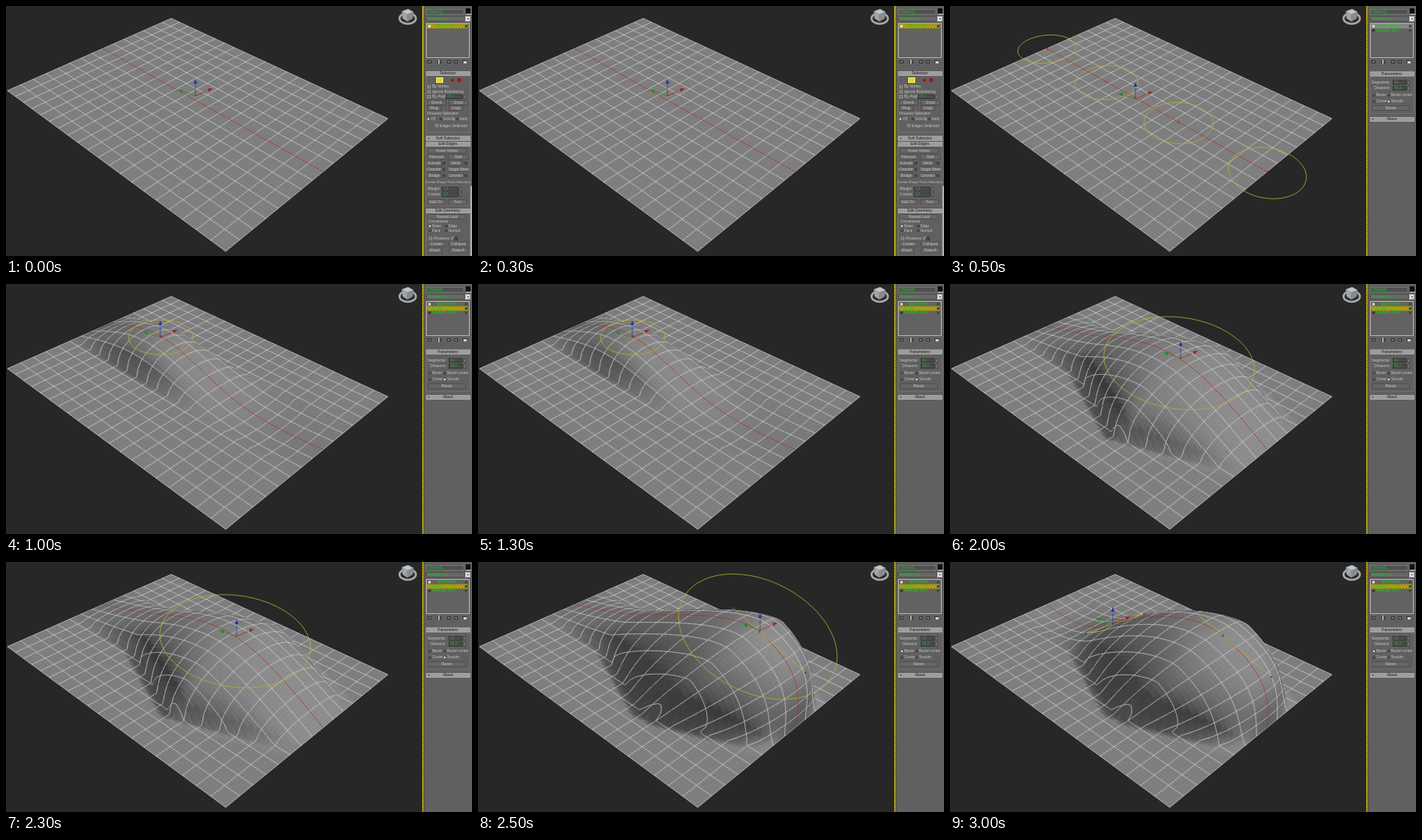
Animation, 598 px wide and 322 px high, one loop 3.5 s. Source, as an HTML page with a canvas:

```html
<!DOCTYPE html>
<html>
<head>
<meta charset="utf-8">
<style>
html, body { margin: 0; width: 598px; height: 322px; overflow: hidden; background: #272727; }
canvas { display: block; }
</style>
</head>
<body>
<canvas id="stage" width="598" height="322"></canvas>
<script>
const ctx = document.getElementById('stage').getContext('2d');
const COLS = 20, ROWS = 15, MID = 7, SUB = 5;
const YELLOW = '#b9b02c', RED = '#b02c2c';

// Knots are [column, height, tangent column, tangent height, back handle scale]
const rest = [[6.67, 0, 2.22, 0], [13.33, 0, 2.22, 0]];
const lifted = [6.67, 1.85, 2.22, .75];
const arched = [lifted, [13.33, 3.05, 2.22, -.27]];
const scenes = [
  { knots: rest, gizmo: [243, 116] },
  { knots: rest, gizmo: [238, 120], circles: [0, 1, 2, 3], distance: '40.0' },
  { knots: [[6.67, 1.85, 2.22, -.12], [13.33, 0, 2.22, -.49]], gizmo: [198, 69], circles: [1], distance: '40.0' },
  { knots: arched, gizmo: [296, 96], circles: [2], distance: '40.0' },
  { knots: arched, wide: true, gizmo: [296, 96], circles: [2], distance: '86.2' },
  { knots: [lifted, [17, 5, 3.1, -1.14, .6]], wide: true, gizmo: [362, 88], circles: [2], handles: [1], distance: '86.2' },
  { knots: [[7.4, 1.4, 3, 2], [16.45, 4.5, 3.35, -1.07, .65]], wide: true, gizmo: [209, 80], handles: [0, 1], distance: '40.0' }
];

function project([i, j, z]) {
  const w = 1 - .01178 * i - .01215 * j - .0131 * z;
  return [(212 + 8.13 * i - 14.03 * j - 3.5 * z) / w, (16 + 4.742 * i + 4.876 * j - 14.51 * z) / w, w];
}

function polyline(points, color, width = 1, close = false) {
  ctx.beginPath();
  points.forEach(p => ctx.lineTo(p[0], p[1]));
  if (close) ctx.closePath();
  ctx.strokeStyle = color;
  ctx.lineWidth = width;
  ctx.stroke();
}

function dot(x, y, r, color) {
  ctx.fillStyle = color;
  ctx.beginPath();
  ctx.arc(x, y, r, 0, 7);
  ctx.fill();
}

const handle = ([x, z, tx, tz, back = 1], side) => {
  const m = side < 0 ? -back : side;
  return [x + m * tx, z + m * tz];
};

// Spline through the two knots with natural ends
function spline([a, b], s) {
  const k = Math.min(2, Math.floor(s * 3)), t = s * 3 - k, q = 1 - t;
  const aIn = handle(a, -1), aOut = handle(a, 1), bIn = handle(b, -1), bOut = handle(b, 1);
  return [0, 1].map(n => {
    const end = n ? 0 : COLS;
    const c = [[0, aIn[n] / 2, aIn[n], a[n]],
      [a[n], aOut[n], bIn[n], b[n]],
      [b[n], bOut[n], (bOut[n] + end) / 2, end]][k];
    return q * q * q * c[0] + 3 * q * q * t * c[1] + 3 * q * t * t * c[2] + t * t * t * c[3];
  });
}

const knotRadius = (scene, k) => scene.wide && k === 2 ? 4.45 : 2.15;

// Half width of the deformed strip at a column
function reach(scene, i) {
  const s = i / COLS * 3, k = Math.min(2, Math.floor(s));
  return 1.18 * (knotRadius(scene, k) + (knotRadius(scene, k + 1) - knotRadius(scene, k)) * (s - k));
}

function buildSurface(scene) {
  return Array.from({ length: COLS * SUB + 1 }, (_, a) => {
    const i = a / SUB, [x, z] = spline(scene.knots, i / COLS), r = reach(scene, i);
    return Array.from({ length: ROWS * SUB + 1 }, (_, b) => {
      const j = b / SUB, pull = Math.sqrt(Math.max(0, 1 - ((j - MID) / r) ** 2));
      const pos = [i + (x - i) * pull, j, z * pull];
      return { pos, at: project(pos) };
    });
  });
}

// Soft shading: the normal spans a few neighbouring facets
function shade(grid, a, b) {
  const lo = v => Math.max(0, v - 2), hi = (v, max) => Math.min(max, v + 3);
  const a0 = lo(a), a1 = hi(a, COLS * SUB), b0 = lo(b), b1 = hi(b, ROWS * SUB);
  const span = (p, q) => [0, 1, 2].map(n => q.pos[n] - p.pos[n]);
  const u = span(grid[a0][b0], grid[a1][b1]), v = span(grid[a1][b0], grid[a0][b1]);
  const n = [u[1] * v[2] - u[2] * v[1], u[2] * v[0] - u[0] * v[2], u[0] * v[1] - u[1] * v[0]];
  const light = (.6 * n[0] - .1 * n[1] + n[2]) / Math.hypot(...n);
  const g = Math.round(38 + 91 * Math.max(0, light));
  return `rgb(${g},${g},${g})`;
}

function drawSurface(scene) {
  const grid = buildSurface(scene), quads = [];
  for (let a = 0; a < COLS * SUB; a++) {
    for (let b = 0; b < ROWS * SUB; b++) {
      const c = [grid[a][b], grid[a + 1][b], grid[a + 1][b + 1], grid[a][b + 1]].map(v => v.at);
      quads.push({ a, b, c, depth: c.reduce((sum, p) => sum + p[2], 0) });
    }
  }
  quads.sort((p, q) => q.depth - p.depth);
  for (const { a, b, c } of quads) {
    const color = shade(grid, a, b);
    polyline(c, color, .6, true);
    ctx.fillStyle = color;
    ctx.fill();
    const edge = (line, m, n, row) => line % SUB === 0 &&
      polyline([c[m], c[n]], row && line === MID * SUB ? RED : '#d2d2d2', .65);
    edge(a, 0, 3);
    edge(a + 1, 1, 2);
    edge(b, 0, 1, true);
    edge(b + 1, 3, 2, true);
  }
}

function drawCircle(scene, k) {
  const [x, z, tx, tz] = k === 0 ? [0, 0, 1, 0] : k === 3 ? [COLS, 0, 1, 0] : scene.knots[k - 1];
  const r = knotRadius(scene, k), len = Math.hypot(tx, tz);
  const ring = Array.from({ length: 72 }, (_, n) => {
    const c = r * Math.cos(n * Math.PI / 36) / len, s = r * Math.sin(n * Math.PI / 36);
    return project([x + tx * c, MID + s, z + tz * c]);
  });
  polyline(ring, YELLOW, .8, true);
  const p = project([x, MID, z]);
  dot(p[0], p[1], 1.1, '#c81e1e');
}

function drawHandle(knot) {
  const points = [-1, 0, 1].map(side => {
    const [x, z] = handle(knot, side);
    return project([x, MID, z]);
  });
  polyline(points, YELLOW, .8);
  points.forEach(p => dot(p[0], p[1], 1.3, '#3848b8'));
}

function drawGizmo([x, y]) {
  polyline([[x - 7, y - 3], [x, y - 7], [x + 7, y - 3], [x, y + 2]], '#a89f3a', .5, true);
  const arrow = (dx, dy, color) => {
    const len = Math.hypot(dx, dy), ux = dx / len, uy = dy / len;
    polyline([[x, y], [x + dx * .65, y + dy * .65]], color, .7);
    const bx = x + dx - ux * 6, by = y + dy - uy * 6;
    ctx.fillStyle = color;
    ctx.beginPath();
    ctx.moveTo(x + dx, y + dy);
    ctx.lineTo(bx - uy * 2.3, by + ux * 2.3);
    ctx.lineTo(bx + uy * 2.3, by - ux * 2.3);
    ctx.fill();
  };
  arrow(-22, -8, '#1f8a2a');
  arrow(22, -10, '#a81a1a');
  arrow(0, -22, '#2430a8');
}

function drawViewCube() {
  ctx.beginPath();
  ctx.ellipse(515.5, 16, 10.5, 7, 0, 0, 7);
  ctx.strokeStyle = '#a8a8a8';
  ctx.lineWidth = 2.6;
  ctx.stroke();
  const face = (points, color) => {
    polyline(points, '#6d7277', .6, true);
    ctx.fillStyle = color;
    ctx.fill();
  };
  face([[508, 7], [516, 4], [523, 8], [515, 11]], '#c0c4c8');
  face([[508, 7], [515, 11], [515, 20], [509, 16]], '#a0a5aa');
  face([[515, 11], [523, 8], [522, 16], [515, 20]], '#868b90');
}

function rect(x, y, w, h, fill, line) {
  ctx.fillStyle = fill;
  ctx.fillRect(x, y, w, h);
  if (!line) return;
  ctx.strokeStyle = line;
  ctx.lineWidth = 1;
  ctx.strokeRect(x + .5, y + .5, w - 1, h - 1);
}

function label(text, x, y, align = 'left', color = '#c6c6c6', size = 5) {
  ctx.font = `${size}px "Liberation Sans", sans-serif`;
  ctx.textAlign = align;
  ctx.textBaseline = 'middle';
  ctx.fillStyle = color;
  ctx.fillText(text, x, y);
}

function bar(text, y, sign = '-') {
  rect(539, y - 3, 57, 6, '#9c9c9c', '#a8a8a8');
  label(sign, 541, y, 'left', '#222');
  label(text, 567, y, 'center', '#1c1c1c');
}

function button(text, x, y, w) {
  rect(x, y - 3.5, w, 7, '#666', '#505050');
  label(text, x + w / 2, y, 'center');
}

function check(text, x, y) {
  rect(x, y - 2, 4, 4, '#555', '#a0a0a0');
  label(text, x + 6, y);
}

function radio(text, x, y, on) {
  dot(x + 2, y, 1.8, '#444');
  if (on) dot(x + 2, y, 1.2, '#eee');
  label(text, x + 5, y, 'left', '#c6c6c6', 4.6);
}

function field(text, x, y, w) {
  rect(x, y - 3, w, 6, '#4a4a4a', '#363636');
  label(text, x + 2, y, 'left', '#27b027', 4.6);
  rect(x + w + 1, y - 3, 3, 6, '#8a8a8a', '#4a4a4a');
}

function group(y, h) {
  ctx.strokeStyle = '#707070';
  ctx.lineWidth = 1;
  ctx.strokeRect(539.5, y + .5, 56, h);
}

function hatchRow(y) {
  rect(540, y - 3, 53, 6, '#8f860c');
  for (let x = 541; x < 593; x += 2) rect(x, y - 3 + (x >> 1) % 2, 1, 5, '#c0b51b');
}

function drawHeader(index) {
  rect(534, 0, 64, 322, '#606060');
  rect(534, 0, 3, 322, '#5a541a');
  rect(534, 0, 2, 322, '#b3a81c');
  if (index) for (let y = 2; y < 322; y += 3) rect(534, y, 2, 1, '#857c18');
  rect(539, 4, 49, 7, '#505050', '#707070');
  label('Object01', 541, 7.5, 'left', '#25c025');
  rect(590, 3, 6, 7, '#111');
  rect(590, 10, 7, 1, '#ddd');
  rect(539, 13, 50, 7, '#686868', '#505050');
  label('Modifier List', 541, 16.5, 'left', '#25c025');
  rect(589, 13, 7, 7, '#e0e0e0', '#aaa');
  rect(592, 16, 2, 1, '#333');
  rect(539, 22, 56, 45, '#626262', '#b5b5b5');
  const rows = index === 0 ? ['Edit Mesh'] : index === 1 ? ['Spl Deform', 'Editable Poly'] : ['Spl Deform', 'Spline', 'Editable Poly'];
  if (index !== 1) hatchRow(index ? 31.5 : 26);
  else rect(540, 23, 53, 6, '#858585');
  rows.forEach((text, n) => {
    const y = 26 + n * 5.5;
    if (n !== 1 || index === 1) rect(542, y - 1.5, 3, 3, n ? '#333' : '#ddd');
    label(text, n ? 547 : 553, y, 'left', '#1bd01b', 5);
    rect(589, y - 1.5, 3, 3, '#444');
  });
  for (const x of [541, 554, 566, 575, 586]) rect(x, 70, 5, 4, '#777', '#333');
  rect(555, 69, 1, 6, '#eee');
  rect(587, 71, 4, 3, '#c8d0dc');
}

function drawEditPanel() {
  group(87, 75);
  bar('Selection', 87);
  rect(552, 92, 9, 7, '#e2d817', '#fff27a');
  dot(573, 95.5, 2.3, '#a81818');
  rect(579, 93, 5, 5, '#a81818');
  check('By Vertex', 541, 104);
  check('Ignore Backfacing', 541, 110.5);
  check('By Angle:', 541, 117);
  field('45.0', 564, 117, 22);
  button('Shrink', 540, 124.5, 25);
  button('Grow', 568, 124.5, 25);
  button('Ring', 540, 131.5, 19);
  button('Loop', 568, 131.5, 19);
  label('Preview Selection', 541, 139);
  ['Off', 'SubObj', 'Multi'].forEach((text, n) => radio(text, [540, 556, 577][n], 145.5, !n));
  label('20 Edges Selected', 592, 155, 'right');
  bar('Soft Selection', 170.5, '+');
  group(178, 78);
  bar('Edit Edges', 178);
  button('Insert Vertex', 541, 186.5, 50);
  [['Remove', 'Split'], ['Extrude', 'Weld'], ['Chamfer', 'Target Weld'], ['Bridge', 'Connect']].forEach(([a, b], n) => {
    const y = 194.5 + n * 8;
    button(a, 540, y, n ? 19 : 25);
    button(b, 567, y, n % 2 ? 20 : 27);
    if (n) rect(560, y - 2, 4, 4, '#444');
    if (n % 2) rect(588, y - 2, 4, 4, '#444');
  });
  label('Create Shape From Selection', 567, 227, 'center', '#c6c6c6', 4.4);
  label('Weight:', 541, 236);
  field('1.0', 559, 236, 22);
  label('Crease:', 541, 243);
  field('0.0', 559, 243, 22);
  button('Edit Tri.', 540, 252.5, 24);
  button('Turn', 568, 252.5, 24);
  group(264, 64);
  bar('Edit Geometry', 264);
  button('Repeat Last', 541, 271.5, 50);
  label('Constraints', 542, 277.5);
  radio('None', 542, 283.5, true);
  radio('Edge', 563, 283.5);
  radio('Face', 542, 289.5);
  radio('Normal', 563, 289.5);
  check('Preserve UVs', 543, 299.5);
  rect(575, 297, 5, 5, '#444');
  button('Create', 540, 307, 25);
  button('Collapse', 568, 307, 25);
  button('Attach', 540, 315, 20);
  button('Detach', 568, 315, 25);
  rect(596, 232, 2, 90, '#b0b0b0');
}

function drawParameterPanel(scene, bezier) {
  group(87, 51);
  bar('Parameters', 87.5);
  label('Segments:', 565, 98.5, 'right');
  field('40', 568, 98.5, 18);
  label('Distance:', 565, 106, 'right');
  field(scene.distance, 568, 106, 18);
  radio('Bezier', 542, 115, bezier);
  radio('Bezier corner', 561, 115);
  radio('Corner', 542, 123);
  radio('Smooth', 561, 123, !bezier);
  button('Reset', 541, 131.5, 49);
  bar('About', 146, '+');
}

function drawScene(index) {
  const scene = scenes[index];
  rect(0, 0, 598, 322, '#272727');
  drawSurface(scene);
  (scene.handles || []).forEach(k => drawHandle(scene.knots[k]));
  (scene.circles || []).forEach(k => drawCircle(scene, k));
  drawGizmo(scene.gizmo);
  drawViewCube();
  drawHeader(index);
  if (index) drawParameterPanel(scene, index > 4);
  else drawEditPanel();
}

let shown = -1;
function tick() {
  const index = Math.floor(performance.now() % 3500 / 500);
  if (index !== shown) drawScene(shown = index);
  requestAnimationFrame(tick);
}
tick();
</script>
</body>
</html>
```
